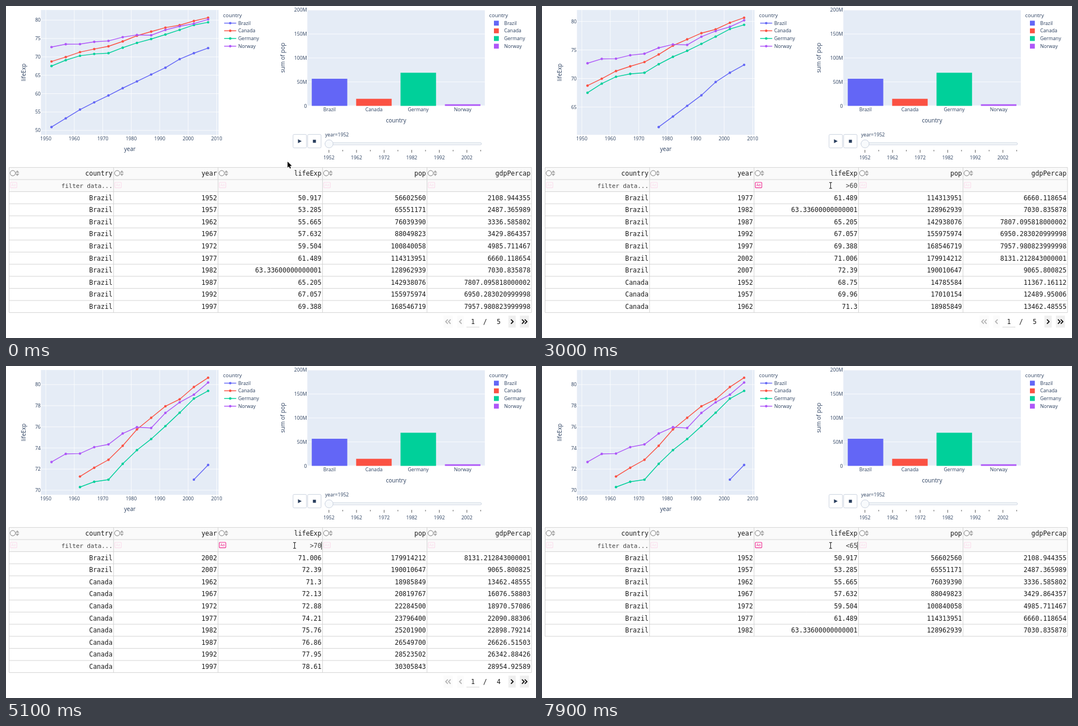
An HTML page with a canvas that plays this animation: 945x593 px, repeating every 8 s.

```html
<!DOCTYPE html>
<html lang="en">
<head>
<meta charset="utf-8">
<title>Filtered table and charts</title>
<style>
html, body { margin: 0; width: 100%; height: 100%; overflow: hidden; background: #fff; }
canvas { display: block; width: 945px; height: 593px; }
</style>
</head>
<body>
<canvas id="stage"></canvas>
<script>
const W = 945, H = 593, LOOP = 8000;
const canvas = document.getElementById('stage');
const ctx = canvas.getContext('2d');
const ratio = window.devicePixelRatio || 1;
canvas.width = W * ratio;
canvas.height = H * ratio;

const SANS = '"Open Sans", sans-serif', MONO = '"DejaVu Sans Mono", monospace';
const INK = '#2a3f5f', PLOT = '#e5ecf6', BORDER = '#d0d0d0';
const TICK = 8.66, AXIS = 10.1, CELL = 11.55;

const countries = [
  { name: 'Brazil', color: '#6366f6', pop1952: 56.60256,
    life: [50.917, 53.285, 55.665, 57.632, 59.504, 61.489, 63.33600000000001, 65.205, 67.057, 69.388, 71.006, 72.39],
    pop: [56602560, 65551171, 76039390, 88049823, 100840058, 114313951, 128962939, 142938076, 155975974, 168546719, 179914212, 190010647],
    gdp: [2108.944355, 2487.365989, 3336.585802, 3429.864357, 4985.711467, 6660.118654, 7030.835878,
      7807.095818000002, 6950.283020999998, 7957.980823999998, 8131.212843000001, 9065.800825] },
  { name: 'Canada', color: '#fb5143', pop1952: 14.785584,
    life: [68.75, 69.96, 71.3, 72.13, 72.88, 74.21, 75.76, 76.86, 77.95, 78.61, 79.77, 80.653],
    pop: [14785584, 17010154, 18985849, 20819767, 22284500, 23796400, 25201900, 26549700, 28523502, 30305843],
    gdp: [11367.16112, 12489.95006, 13462.48555, 16076.58803, 18970.57086, 22090.88306, 22898.79214,
      26626.51503, 26342.88426, 28954.92589] },
  { name: 'Germany', color: '#00d09a', pop1952: 69.145952,
    life: [67.5, 69.1, 70.3, 70.8, 71, 72.5, 73.8, 74.847, 76.07, 77.34, 78.67, 79.406] },
  { name: 'Norway', color: '#ae57f8', pop1952: 3.327728,
    life: [72.67, 73.44, 73.47, 74.08, 74.34, 75.37, 75.97, 75.89, 77.32, 78.32, 79.05, 80.196] }
];

const rows = countries.flatMap(c => c.life.map((life, i) =>
  ({ country: c, year: 1952 + 5 * i, life, pop: c.pop?.[i], gdp: c.gdp?.[i] })));

const all = () => true, above60 = v => v > 60, above70 = v => v > 70, below65 = v => v < 65;
const tableFilters = [[0, all], [3000, above60], [4900, above70], [7900, below65]];
const chartFilters = [[0, all], [3000, above60], [5100, above70]];

// [time, typed text, caret visible]
const typing = [
  [0, '', false], [800, '', true], [1300, '>', true], [1900, '>', false],
  [2300, '>6', true], [2400, '>60', true], [3000, '>60', false], [3700, '>60', true],
  [3900, '>6', true], [4000, '>', true], [4300, '>', false], [4400, '>7', true],
  [4600, '>70', true], [5200, '>70', false], [5700, '>7', true], [5800, '>', true],
  [6000, '', true], [6300, '<', true], [6900, '<', false], [7500, '<6', true], [7600, '<65', true]
];

const at = (steps, t) => steps.filter(s => s[0] <= t).pop();

function text(str, x, y, size = TICK, align = 'left', color = INK, family = SANS) {
  ctx.font = size + 'px ' + family;
  ctx.textAlign = align;
  ctx.fillStyle = color;
  ctx.fillText(str, x, y);
}

function verticalText(str, x, y) {
  ctx.save();
  ctx.translate(x, y);
  ctx.rotate(-Math.PI / 2);
  text(str, 0, 0, AXIS, 'center');
  ctx.restore();
}

function rect(x, y, w, h, color) {
  ctx.fillStyle = color;
  ctx.fillRect(x, y, w, h);
}

function path(points, color, width, close) {
  ctx.beginPath();
  points.forEach(p => ctx.lineTo(p[0], p[1]));
  if (close) ctx.closePath();
  ctx.strokeStyle = color;
  ctx.lineWidth = width;
  ctx.stroke();
}

function polygon(points, color) {
  ctx.beginPath();
  points.forEach(p => ctx.lineTo(p[0], p[1]));
  ctx.fillStyle = color;
  ctx.fill();
}

function circle(x, y, r, fill, stroke, width = 0.8) {
  ctx.beginPath();
  ctx.arc(x, y, r, 0, 7);
  if (fill) { ctx.fillStyle = fill; ctx.fill(); }
  if (stroke) { ctx.strokeStyle = stroke; ctx.lineWidth = width; ctx.stroke(); }
}

function roundBox(x, y, w, h, r, fill, stroke, width = 0.8) {
  ctx.beginPath();
  ctx.roundRect(x, y, w, h, r);
  if (fill) { ctx.fillStyle = fill; ctx.fill(); }
  ctx.strokeStyle = stroke;
  ctx.lineWidth = width;
  ctx.stroke();
}

function lineChart(keep) {
  const left = 62.3, right = 379, top = 7.2, bottom = 230;
  const shown = rows.filter(r => keep(r.life));
  const low = Math.min(...shown.map(r => r.life)), high = 80.653;
  const px = year => 71 + 5.077 * (year - 1950);
  const py = v => 216.2 - (v - low) * 195.3 / (high - low);

  rect(left, top, right - left, bottom - top, PLOT);
  for (let year = 1950; year <= 2010; year += 10) {
    path([[px(year), top], [px(year), bottom]], '#fff', 0.8);
    text(year, px(year), 239.9, TICK, 'center');
  }
  const step = high - low > 15 ? 5 : 2;
  for (let v = 50; v <= 80; v += step) {
    if (py(v) > bottom) continue;
    path([[left, py(v)], [right, py(v)]], '#fff', 0.8);
    text(v, 61.8, py(v) + 3.1, TICK, 'right');
  }
  for (const c of countries) {
    const points = shown.filter(r => r.country === c).map(r => [px(r.year), py(r.life)]);
    path(points, c.color, 1.45);
    points.forEach(p => circle(p[0], p[1], 2.2, c.color));
  }
  text('year', 220.7, 259.3, AXIS, 'center');
  verticalText('lifeExp', 34.5, 118.5);

  text('country', 387, 19.8, 9.4);
  countries.forEach((c, i) => {
    const y = 30.6 + 13.71 * i;
    path([[389, y], [410.5, y]], c.color, 1.45);
    circle(399.8, y, 2.2, c.color);
    text(c.name, 414, y + 3.1);
  });
}

function barChart() {
  const left = 537.3, right = 853.8, top = 7.2, zero = 178.4;
  const py = millions => zero - millions * (zero - top) / 200;
  rect(left, top, right - left, zero - top, PLOT);
  for (let m = 0; m <= 200; m += 50) {
    path([[left, py(m)], [right, py(m)]], '#fff', m ? 0.8 : 1.4);
    text(m ? m + 'M' : '0', 536.5, py(m) + 3.1, TICK, 'right');
  }
  const slot = (right - left) / 4;
  text('country', 861.5, 19.8, 9.4);
  countries.forEach((c, i) => {
    const x = left + slot * i, y = py(c.pop1952);
    rect(x + slot * 0.1, y, slot * 0.8, zero - y, c.color);
    text(c.name, x + slot / 2, 188, TICK, 'center');
    const legendY = 30.6 + 13.71 * i;
    rect(870, legendY - 4.3, 8.7, 8.7, c.color);
    text(c.name, 888.3, legendY + 3.1);
  });
  text('country', 695.5, 207.8, AXIS, 'center');
  verticalText('sum of pop', 497, 92.5);
}

function slider() {
  const edge = '#bec8d9';
  roundBox(511.8, 229.4, 24, 24, 2, '#fff', edge);
  roundBox(537.8, 229.4, 24, 24, 2, '#fff', edge);
  polygon([[520.6, 238.1], [520.6, 244.9], [527.2, 241.5]], INK);
  rect(547.2, 238.9, 5.4, 5.4, INK);

  text('year=1952', 569, 233.3);
  roundBox(569, 244.3, 278.8, 3.6, 1.8, '#f8fafc', edge);
  circle(576, 246.2, 7.2, '#f8fafc', edge);
  for (let i = 0; i < 12; i++) {
    const x = 575.8 + 24.6 * i, major = i % 2 === 0;
    path([[x, 257], [x, major ? 262 : 259.6]], '#333', 0.8);
    if (major) text(1952 + 5 * i, x, 273.5, TICK, 'center');
  }
}

const colX = i => 5.5 + 186.3 * i;
const rowY = i => 288.4 + 21.6 * i;

function cellText(str, col, row, size = CELL, color = '#1c1c1c') {
  text(str, colX(col + 1) - 1.9, rowY(row) + 14.9, size, 'right', color, MONO);
}

function filterIcon(x, active) {
  ctx.globalAlpha = active ? 1 : 0.2;
  roundBox(x + 2.2, 315, 11.6, 9.6, 1, null, active ? '#f0288f' : '#ff69b4', 1.1);
  text('Aa', x + 8, 322.4, 6.6, 'center', active ? '#f0288f' : '#ff69b4', SANS);
  ctx.globalAlpha = 1;
}

function table(matching, typed, caret, hover) {
  const page = matching.slice(0, 10), lines = page.length + 2;
  rect(colX(0), rowY(0), colX(5) - colX(0), 43.2, '#fafafa');
  for (let i = 0; i <= lines; i++) path([[colX(0), rowY(i)], [colX(5), rowY(i)]], BORDER, 0.9);
  for (let i = 0; i <= 5; i++) path([[colX(i), rowY(0)], [colX(i), rowY(lines)]], BORDER, 0.9);

  ['country', 'year', 'lifeExp', 'pop', 'gdpPercap'].forEach((name, i) => {
    const x = colX(i);
    circle(x + 6.5, 298.6, 4.7, '#fff', '#6a6a6a', 0.9);
    polygon([[x + 11.2, 297.8], [x + 14.7, 293.6], [x + 18.2, 297.8]], '#aaa');
    polygon([[x + 11.2, 299.6], [x + 14.7, 303.8], [x + 18.2, 299.6]], '#aaa');
    cellText(name, i, 0);
    filterIcon(x, i === 2 && hover);
  });

  cellText('filter data...', 0, 1, 10.83, '#444');
  if (typed) cellText(typed, 2, 1, CELL, '#444');
  else if (hover) cellText('filter data...', 2, 1, 10.83, '#444');
  if (caret) rect(562.2, 314, 0.9, 14, '#222');

  page.forEach((r, i) =>
    [r.country.name, r.year, r.life, r.pop, r.gdp].forEach((v, col) => cellText(v, col, i + 2)));
}

function chevrons(x, dir, count, color) {
  for (let i = 0; i < count; i++) {
    const cx = x + (i - (count - 1) / 2) * 5;
    path([[cx - 1.9 * dir, 559.8], [cx + 1.9 * dir, 563.7], [cx - 1.9 * dir, 567.6]], color, 1.8);
  }
}

function pager(pages) {
  if (pages < 2) return;
  const button = (x, w, dir, count, enabled) => {
    rect(x - w / 2, 553, w, 21.4, enabled ? '#efefef' : '#fbfbfb');
    chevrons(x, dir, count, enabled ? '#111' : '#b4b4b4');
  };
  button(788.4, 16, -1, 2, false);
  button(810.5, 12, -1, 1, false);
  button(902.3, 13, 1, 1, true);
  button(924.4, 16, 1, 2, true);
  text('1', 832.5, 568.2, CELL, 'center', '#1c1c1c', MONO);
  path([[821, 573.5], [844, 573.5]], '#ccc', 0.8);
  text('/', 854.3, 568.2, CELL, 'center', '#1c1c1c', MONO);
  text(pages, 878.5, 568.2, CELL, 'center', '#1c1c1c', MONO);
}

function arrow(x, y) {
  const shape = [[0, 0], [0, 10.8], [2.5, 8.5], [4.2, 12.3], [6, 11.5], [4.3, 7.8], [7.6, 7.6]]
    .map(p => [x + p[0], y + p[1]]);
  path(shape, '#fff', 1.4, true);
  polygon(shape, '#000');
}

function beam(x, y) {
  const parts = [[[x, y - 5], [x, y + 5]], [[x - 2.5, y - 5.2], [x + 2.5, y - 5.2]], [[x - 2.5, y + 5.2], [x + 2.5, y + 5.2]]];
  parts.forEach(p => path(p, '#fff', 2.4));
  parts.forEach(p => path(p, '#111', 1));
}

function pointer(t) {
  const p = Math.min(1, Math.floor(t / 100) / 8);
  const x = 502 + 12.6 * p;
  const y = 278 + 42.5 * p + 30 * p * Math.sin(Math.PI * p);
  return { x, y, over: y > rowY(1) && y < rowY(2) };
}

function draw(t) {
  const [, typed, caret] = at(typing, t);
  const keep = at(tableFilters, t)[1];
  const matching = rows.filter(r => keep(r.life));
  const mouse = pointer(t);

  ctx.setTransform(ratio, 0, 0, ratio, 0, 0);
  rect(0, 0, W, H, '#fff');
  lineChart(at(chartFilters, t)[1]);
  barChart();
  slider();
  table(matching, typed, caret, mouse.over);
  pager(Math.ceil(matching.length / 10));
  (mouse.over ? beam : arrow)(mouse.x, mouse.y);
}

const start = performance.now();
function tick() {
  draw((performance.now() - start) % LOOP);
  requestAnimationFrame(tick);
}
tick();
</script>
</body>
</html>
```
